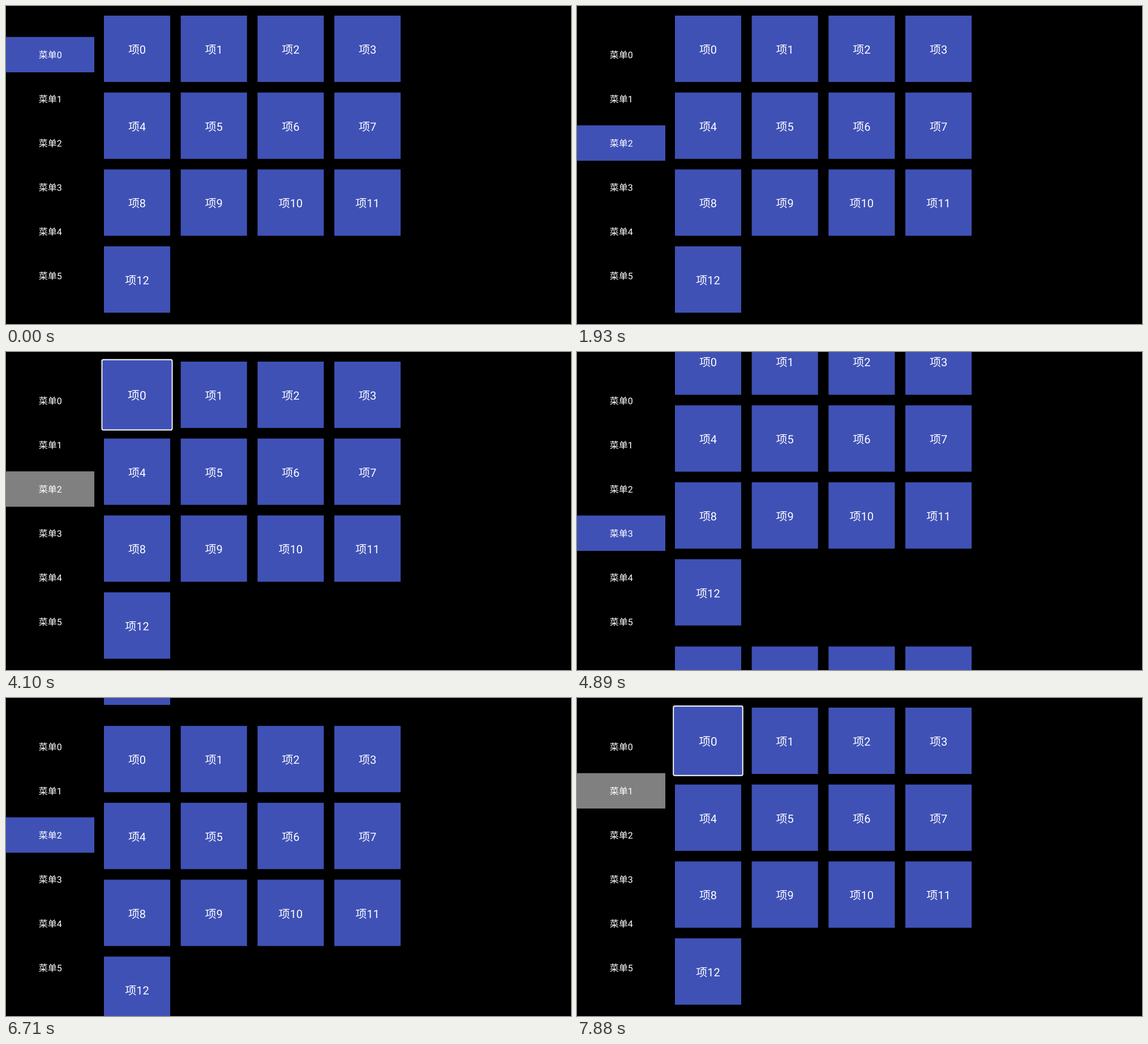
An HTML page for the animation above (8 s loop, 998 by 561 pixels).

```html
<!DOCTYPE html>
<html lang="zh-CN">
<head>
<meta charset="utf-8">
<title>菜单</title>
<style>
  html, body { margin: 0; width: 100%; height: 100%; overflow: hidden; background: #000; }
  svg { display: block; width: 998px; height: 561px; }
  text {
    fill: #fff; text-anchor: middle; text-rendering: geometricPrecision;
    font-family: Roboto, "Noto Sans CJK SC", "Noto Sans CJK", sans-serif;
  }
  .item text { font-size: 20px; }
  .menu text { font-size: 16px; }
  .tile { fill: #3f51b5; }
  .ring { fill: none; stroke: #fff; stroke-width: 1.8; visibility: hidden; }
</style>
</head>
<body>
<svg id="stage" viewBox="0 0 998 561"></svg>
<script>
const LOOP = 8000, REFRESH = 135.8, PAGE = 561;
const COLS = 4, ITEMS = 13, MENUS = 6;
const SIZE = 117, PITCH = 135.67, BAR_PITCH = 77.97;
const SCROLL_MS = 300, SCALE_MS = 180, GROW = 0.05;

// Remote control: first press, gap between presses, keys
const presses = [
  [920, 680, "↓↓"],
  [2110, 245, "→→→→"],
  [3120, 205, "←←←"],
  [3825, 605, "↑←"],
  [4826, 668, "↓→"],
  [6105, 503, "←↑"],
  [7255, 503, "↑→"]
];

// Turns the key presses into a list of { at, menu, item }; item -1 means the menu has focus
function follow() {
  const step = { "↑": -1, "↓": 1, "←": -1, "→": 1 };
  const moves = [];
  let menu = 0, item = -1, last = COLS;
  for (const [first, gap, keys] of presses) {
    [...keys].forEach((key, i) => {
      const vertical = key === "↑" || key === "↓";
      if (item < 0) {
        if (vertical) menu += step[key];
        else item = last;
      } else if (key === "←" && item % COLS === 0) {
        last = item;
        item = -1;
      } else {
        item += step[key] * (vertical ? COLS : 1);
      }
      moves.push({ at: first + i * gap, menu, item });
    });
  }
  return moves;
}

const moves = follow();
const stage = document.getElementById("stage");

function add(parent, tag, attrs, label) {
  const el = document.createElementNS("http://www.w3.org/2000/svg", tag);
  for (const k in attrs) el.setAttribute(k, attrs[k]);
  if (label) el.textContent = label;
  parent.appendChild(el);
  return el;
}

function square(parent, side, attrs) {
  return add(parent, "rect", { x: -side / 2, y: -side / 2, width: side, height: side, ...attrs });
}

function makePage() {
  const root = add(stage, "g", {});
  const items = Array.from({ length: ITEMS }, (_, i) => {
    const x = 173 + SIZE / 2 + (i % COLS) * PITCH;
    const y = 17 + SIZE / 2 + Math.floor(i / COLS) * PITCH;
    const el = add(root, "g", { class: "item" });
    square(el, SIZE, { class: "tile" });
    add(el, "text", { y: 8.5 }, "项" + i);
    const ring = square(el, SIZE + 1.2, { class: "ring", rx: 2.4 });
    const scale = s => el.setAttribute("transform", `translate(${x} ${y}) scale(${s})`);
    return { ring, scale };
  });
  items.forEach(it => it.scale(1));
  return { items, move: y => root.setAttribute("transform", `translate(0 ${y})`) };
}

const front = makePage(), next = makePage();

const bars = Array.from({ length: MENUS }, (_, i) => {
  const g = add(stage, "g", { class: "menu", transform: `translate(0 ${54.6 + i * BAR_PITCH})` });
  const bar = add(g, "rect", { width: 156, height: 62.4 });
  add(g, "text", { x: 78.3, y: 37.4 }, "菜单" + i);
  return bar;
});

function ease(ms, span) {
  const x = Math.min(1, ms / span);
  return (1 - Math.cos(Math.PI * x)) / 2;
}

function draw(t) {
  const lift = Array(ITEMS).fill(0);
  let scroll = 0, menu = 0, item = -1;
  for (const move of moves) {
    const age = t - move.at;
    if (age < 0) break;
    scroll += (move.menu - menu) * PAGE * ease(age, SCROLL_MS);
    if (move.item !== item) {
      const p = ease(age, SCALE_MS);
      if (move.item >= 0) lift[move.item] += p;
      if (item >= 0) lift[item] -= p;
    }
    ({ menu, item } = move);
  }
  const shift = scroll % PAGE;
  front.move(-shift);
  next.move(PAGE - shift);
  front.items.forEach((it, i) => {
    it.scale(1 + GROW * lift[i]);
    it.ring.style.visibility = i === item ? "visible" : "hidden";
  });
  bars.forEach((bar, i) => {
    bar.setAttribute("fill", i !== menu ? "none" : item < 0 ? "#3f51b5" : "#808080");
  });
}

const start = performance.now();

function frame() {
  const t = (performance.now() - start) % LOOP;
  draw(Math.floor(t / REFRESH) * REFRESH);
  requestAnimationFrame(frame);
}
frame();
</script>
</body>
</html>
```
